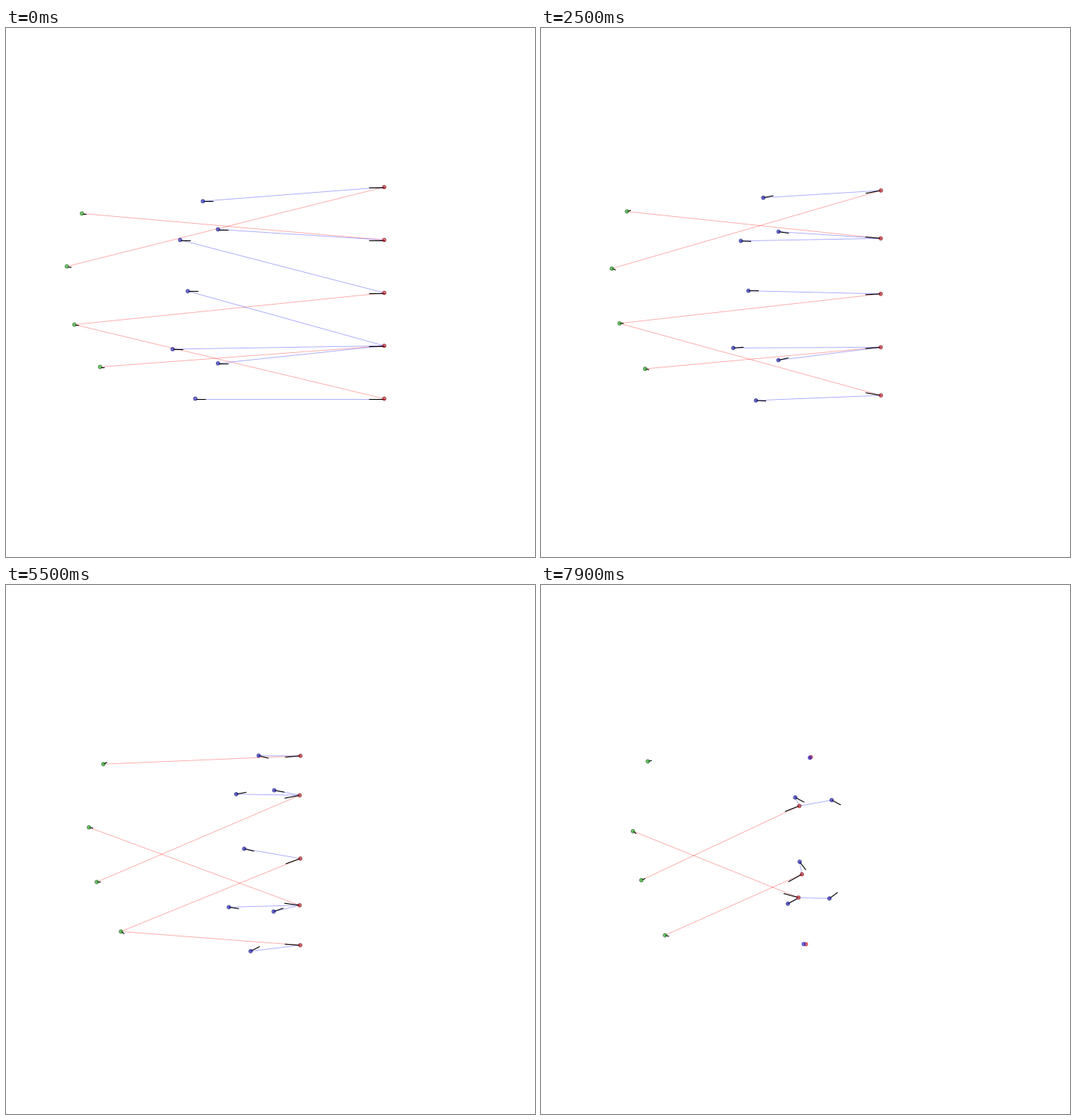
Write a matplotlib script that moves like this. It is 700 px wide and 700 px high and loops after 8000 ms.

```python
import numpy as np
import matplotlib.pyplot as plt
from matplotlib.animation import FuncAnimation
from matplotlib.collections import LineCollection

SIZE, DPI = 700, 100
FRAMES, STEP = 80, 100
VECTOR = 10             # heading lines show ten steps of travel
GAIN = 5                # proportional navigation gain
WEAVE = .018            # turn per step of the weaving greens
MAX_TURN = .028         # turn limit of the blues
RETARGET = 34           # reds swap goals here
HIT_GAP = 4

SPEED = {"green": .544, "red": 2.04, "blue": 1.36}
COLOR = {"green": (.1, .72, .1), "red": (.88, .1, .14), "blue": (.1, .1, .82)}
START = {
    "green": [(100, 245), (80, 315), (90, 392), (124, 448)],
    "red": [(500, y) for y in range(210, 491, 70)],
    "blue": [(260, 228.7), (230, 280), (240, 347.7), (280, 266),
             (220, 424.5), (280, 443.3), (250, 490)],
}

# First turn direction of each green and the steps where it reverses
WEAVES = [(-1, [20, 30, 51, 75]), (1, [22, 44]),
          (-1, [13, 41]), (1, [18, 24, 50, 76])]

# Green goal of each red, red goal of each blue, before and after a swap
RED_GOALS = ([1, 0, 2, 3, 2], [0, 2, 3, 1, 3])
BLUE_GOALS = ([0, 2, 3, 1, 3, 3, 4], [0, 1, 2, 1, 3, 3, 4])
DUELS = [(0, 0), (6, 4)]    # blue and red that meet


def red_goals(f):
    return RED_GOALS[f >= RETARGET]


def blue_goals(f):
    return BLUE_GOALS[f >= 1]


class Team:
    def __init__(self, name, heading):
        self.speed = SPEED[name]
        self.pos = np.array(START[name], float)
        self.heading = np.full(len(self.pos), heading, float)
        self.alive = np.ones(len(self.pos), bool)
        self.log = []

    def vel(self):
        way = np.stack([np.cos(self.heading), np.sin(self.heading)], 1)
        return self.speed * way * self.alive[:, None]

    def record(self):
        self.log.append((self.pos.copy(), self.vel(), self.alive.copy()))

    def advance(self, turn):
        self.pos += self.vel()
        self.heading += turn


def sight(team, goal, picks):
    """Turn rate of each line of sight, and whether its gap is closing."""
    gap = goal.pos[picks] - team.pos
    drift = goal.vel()[picks] - team.vel()
    cross = gap[:, 0] * drift[:, 1] - gap[:, 1] * drift[:, 0]
    return cross / (gap ** 2).sum(1), (gap * drift).sum(1) < 0


def weave_turn(f):
    return WEAVE * np.array([sign * (-1) ** sum(f >= t for t in flips)
                             for sign, flips in WEAVES])


def simulate():
    green, red, blue = Team("green", 0), Team("red", np.pi), Team("blue", 0)
    for f in range(FRAMES):
        for team in (green, red, blue):
            team.record()

        rate, closing = sight(red, green, red_goals(f))
        red_turn = GAIN * rate * closing

        # Blues also copy the sideways push of the red they chase
        picks = blue_goals(f + 1)
        rate, closing = sight(blue, red, picks)
        push = red.speed / blue.speed * red_turn[picks]
        blue_turn = np.clip(GAIN * rate + push, -MAX_TURN, MAX_TURN) * closing

        green.advance(weave_turn(f))
        red.advance(red_turn)
        blue.advance(blue_turn)

        closing = sight(blue, red, picks)[1]
        for b, r in DUELS:
            gap = np.hypot(*(blue.pos[b] - red.pos[r]))
            if gap < HIT_GAP or not closing[b]:
                blue.alive[b] = red.alive[r] = False
    return {"green": green.log, "red": red.log, "blue": blue.log}


logs = simulate()

fig = plt.figure(figsize=(SIZE / DPI, SIZE / DPI), dpi=DPI, facecolor="white")
ax = fig.add_axes([0, 0, 1, 1])
ax.set_xlim(-.5, SIZE - .5)
ax.set_ylim(SIZE - .5, -.5)
ax.axis("off")


def add_lines(z, **style):
    lines = LineCollection([], zorder=z, **style)
    ax.add_collection(lines, autolim=False)
    return lines


red_links = add_lines(1, colors="red", linewidths=.65, alpha=.34)
blue_links = add_lines(2, colors="blue", linewidths=.65, alpha=.34)
headings = add_lines(3, colors="black", linewidths=.8)
dots = {name: ax.scatter(*np.transpose(START[name]), s=11, linewidths=.75,
                         zorder=z)
        for z, name in enumerate(logs, 4)}


def links(name, goal, picks, f):
    pos, _, alive = logs[name][f]
    ends = logs[goal][f][0][picks]
    return [(a, b) for a, b, on in zip(pos, ends, alive) if on]


def update(f):
    red_links.set_segments(links("red", "green", red_goals(f), f))
    blue_links.set_segments(links("blue", "red", blue_goals(f), f))

    vectors = []
    for name, log in logs.items():
        pos, vel, alive = log[f]
        vectors += [(p, p + VECTOR * v)
                    for p, v, on in zip(pos, vel, alive) if on]
        color = np.array(COLOR[name])
        dots[name].set_offsets(pos)
        dots[name].set_facecolor((*color, .6))
        dots[name].set_edgecolor([(*color * (.4 if on else .85), .6)
                                  for on in alive])
    headings.set_segments(vectors)
    return red_links, blue_links, headings, *dots.values()


anim = FuncAnimation(fig, update, frames=FRAMES, interval=STEP,
                     repeat=True, repeat_delay=0)
plt.show()
```
